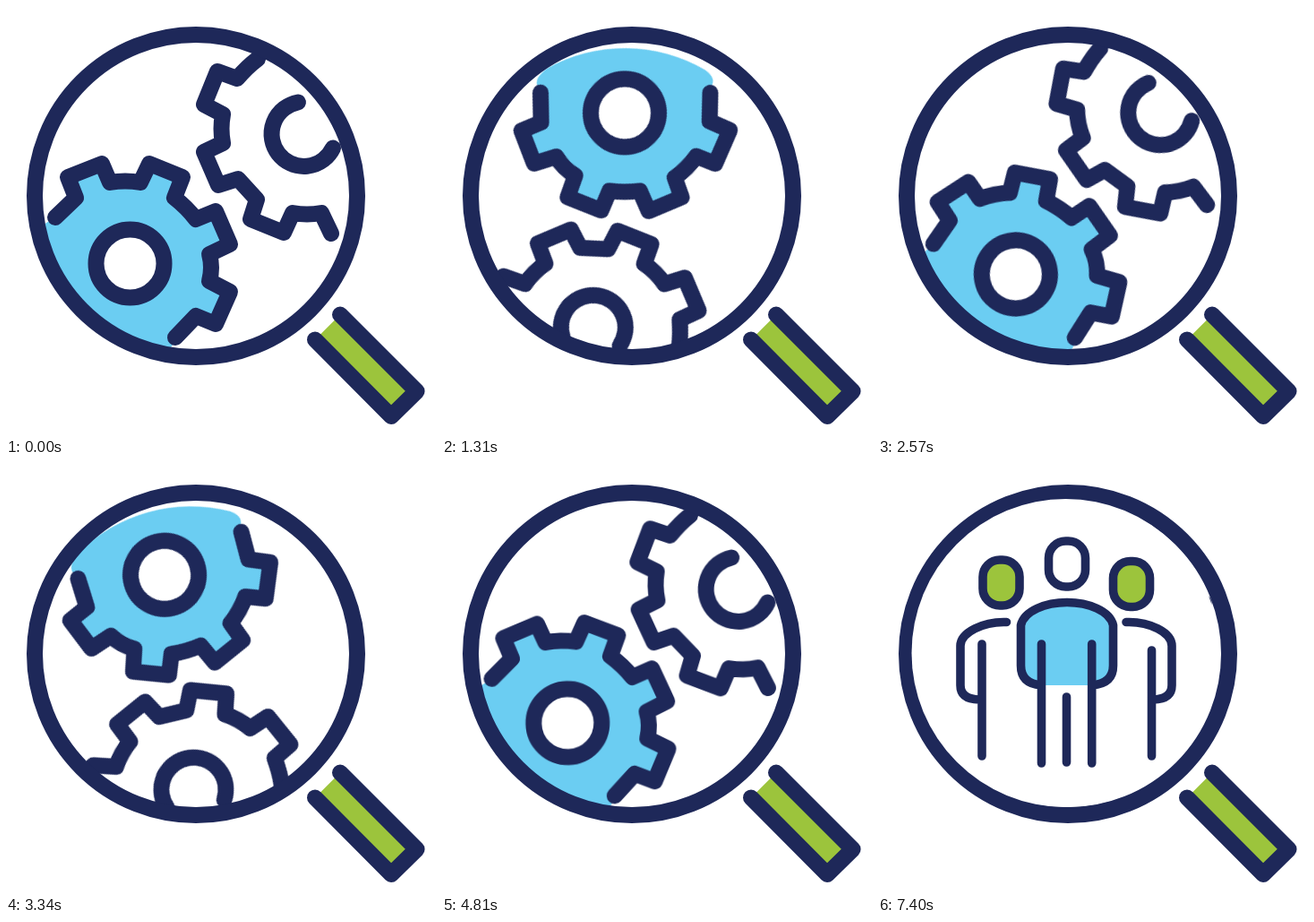
An HTML page that plays this animation: 480x480 px, repeating every 8 s.

```html
<!DOCTYPE html>
<html lang="en">
<head>
<meta charset="utf-8">
<title>Magnifier with gears and team</title>
<style>
  :root { --navy: #1e2859; --blue: #6bcdf2; --green: #9cc43c; }
  html, body { margin: 0; width: 100%; height: 100%; overflow: hidden; background: #fff; }
  svg { display: block; width: 100%; height: 100%; }
  path, rect, circle {
    fill: none; stroke: var(--navy); stroke-width: 18;
    stroke-linecap: round; stroke-linejoin: round;
  }
  .blue { fill: var(--blue); }
  .green { fill: var(--green); }
  .white { fill: #fff; }
  .flat { stroke: none; }

  .gears { transform-origin: 206px 217px; animation: turn 8s infinite; }
  .team {
    transform-origin: 210.5px 212px;
    animation: fade 8s infinite, widen 8s infinite;
  }
  .team path, .team rect { stroke-width: 9.6; }

  /* Two turns at 14 pictures a second, then a rest */
  @keyframes turn {
    0% { transform: rotate(0deg); animation-timing-function: step-end; }
    6.75% { transform: rotate(4.6deg); animation-timing-function: steps(61, end); }
    60.124% { transform: rotate(728.06deg); animation-timing-function: step-end; }
    60.125%, 100% { transform: rotate(718.57deg); }
  }
  @keyframes fade {
    0% { opacity: 0; }
    79.375% { opacity: 0; animation-timing-function: steps(16, start); }
    93.375%, 100% { opacity: 1; }
  }
  @keyframes widen {
    0% { transform: scaleX(.5); }
    79.375% { transform: scaleX(.5); animation-timing-function: steps(12, start); }
    89.875%, 100% { transform: scaleX(1); }
  }
</style>
</head>
<body>
<svg viewBox="0 0 480 480">
  <path class="green" d="M345 372.5 L430 458 L458.5 430 L373 344.5"/>

  <g class="gears">
    <path class="blue flat" d="M55 236 L78 214 L69 191 L107 176 L116 197 Q133 194 150 197 L160 176 L197 191 L188 214
      Q202 225 212 238 L234 229 L250 266 L227 277 Q231 292 227 307 L250 319 L234 355 L212 346 L189 370
      L185 380 Q180 386 165 384 A178 178 0 0 1 41 258 Q39 246 45 242 Z"/>
    <path d="M55 236 L78 214 L69 191 L107 176 L116 197 Q133 194 150 197 L160 176 L197 191 L188 214
      Q202 225 212 238 L234 229 L250 266 L227 277 Q231 292 227 307 L250 319 L234 355 L212 346 L189 370"/>
    <circle class="white" cx="138.5" cy="287.5" r="38"/>
    <path d="M281 59 Q269 68 258 81 L236 73 L221 110 L242 121 Q239 137 242 153 L221 163 L237 200 L259 193
      Q269 204 280 216 L273 238 L310 253 L320 231 Q336 234 352 231 L363 254"/>
    <path d="M326 107.5 A36 36 0 1 0 365 158.5"/>
  </g>

  <circle cx="212" cy="212" r="180"/>

  <g class="team">
    <circle class="white flat" cx="209.5" cy="211" r="172"/>
    <rect class="green" x="117" y="107" width="41" height="51" rx="19"/>
    <rect x="190.5" y="86" width="41" height="51" rx="19"/>
    <rect class="green" x="262.5" y="108.5" width="41" height="51" rx="19"/>
    <path d="M143.500 176.500 C118 175.500 92 188 92 203 V247 Q92 262.500 113 263 M116 201 V326"/>
    <path d="M277 176.500 C303 175.500 328 188 328 203 V247 Q328 262.500 307 263 M305.500 208 V326"/>
    <path class="blue flat" d="M182 247 Q159.500 245 159.500 225 V180 C163 164 187 154.500 211 154.500
      C235 154.500 259 164 262.500 180 V225 Q262.500 245 239 247 Z"/>
    <path d="M182 247 Q159.500 245 159.500 225 V180 C163 164 187 154.500 211 154.500
      C235 154.500 259 164 262.500 180 V225 Q262.500 245 239 247"/>
    <path d="M182.500 201 V334 M238.700 201 V334 M210.500 260 V333"/>
  </g>
</svg>
</body>
</html>
```
